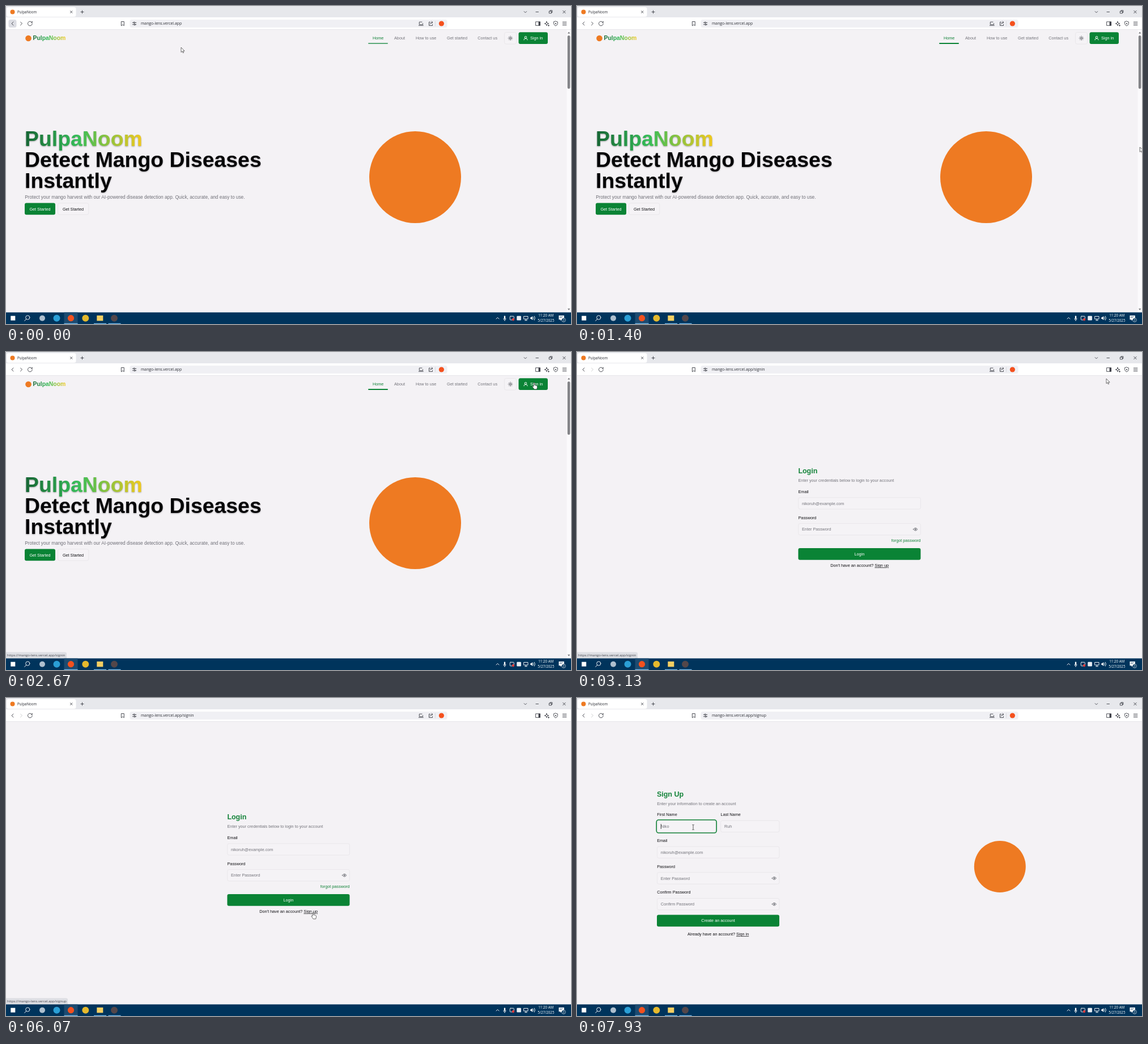
An HTML page for the animation above (8 s loop, 997x561 px).

```html
<!DOCTYPE html>
<html lang="en">
<head>
<meta charset="utf-8">
<title>Browser walkthrough</title>
<style>
html, body { margin: 0; width: 100%; height: 100%; overflow: hidden; background: #f4f2f5; }
svg { display: block; width: 997px; height: 561px; }
text { font: 7.27px "Liberation Sans", Arial, sans-serif; fill: #111114; white-space: pre; }
.ui text { font: 6.85px "Open Sans", sans-serif; fill: #2a2c33; }
.ui .tab { font-size: 6.23px; }
.ui .status { font-size: 6px; fill: #45474e; }
.ui .clock { font-size: 6.2px; fill: #fff; text-anchor: middle; }
.h1 { font-size: 37.4px; font-weight: bold; fill: #050507; }
.h2 { font-size: 12.46px; font-weight: bold; fill: #138339; }
.brand { font-size: 10.4px; font-weight: bold; fill: url(#leaf); }
.lead { font-size: 8.31px; fill: #707078; }
.muted { fill: #74747b; }
.green { fill: #138339; }
.light { fill: #fff; }
.mid { text-anchor: middle; }
.end { text-anchor: end; }
.link { text-decoration: underline; }
.shadow { filter: drop-shadow(0 1.6px 1.2px rgba(0,0,0,.32)); }
.btn { fill: #0a8335; }
.box { fill: #f5f3f6; stroke: #e6e4e8; stroke-width: .8; }
.line { fill: none; stroke: #3d3f47; stroke-width: .9; stroke-linecap: round; stroke-linejoin: round; }
.thin { stroke-width: .7; }
.white { stroke: #fff; }
.mark { fill: #ee7a22; }

.cut { animation: 8s step-end infinite; }
.home { animation-name: home; }
.login { animation-name: login; }
.signup { animation-name: signup; }
.hintIn { animation-name: hintIn; }
.hintUp { animation-name: hintUp; }
.focus { animation-name: focus; }
.arrow { animation-name: arrow; }
.hand { animation-name: hand; }
.beam { animation-name: beam; }
.fwd { animation-name: fwd; }
.hover { animation: hover 8s infinite; }
.active { animation: active 8s infinite; }
.pointer { animation: move 8s ease-in-out infinite; }

@keyframes home { 0% { opacity: 1 } 35.8%, to { opacity: 0 } }
@keyframes login { 0% { opacity: 0 } 35.8% { opacity: 1 } 79%, to { opacity: 0 } }
@keyframes signup { 0% { opacity: 0 } 79%, to { opacity: 1 } }
@keyframes hintIn { 0% { opacity: 0 } 33% { opacity: 1 } 41.5%, to { opacity: 0 } }
@keyframes hintUp { 0% { opacity: 0 } 73% { opacity: 1 } 82.5%, to { opacity: 0 } }
@keyframes focus { 0% { opacity: 0 } 94%, to { opacity: 1 } }
@keyframes fwd { 0% { opacity: 1 } 35.8%, to { opacity: .28 } }
@keyframes hover { 0% { opacity: 1 } 2.5%, to { opacity: 0 } }
@keyframes active { 0% { opacity: .65 } 3%, to { opacity: 1 } }
@keyframes arrow {
  0% { opacity: 1 } 31.6% { opacity: 0 } 35.8% { opacity: 1 } 53.6% { opacity: 0 }
  66.5% { opacity: 1 } 70.8% { opacity: 0 } 79% { opacity: 1 } 88.5%, to { opacity: 0 }
}
@keyframes hand {
  0% { opacity: 0 } 31.6% { opacity: 1 } 35.8% { opacity: 0 } 70.8% { opacity: 1 } 79%, to { opacity: 0 }
}
@keyframes beam {
  0% { opacity: 0 } 53.6% { opacity: 1 } 66.5% { opacity: 0 } 88.5%, to { opacity: 1 }
}
@keyframes move {
  0% { transform: translate(309px, 73px) }
  8.5%, 11.5% { transform: translate(995.4px, 350px) }
  20%, 26% { transform: translate(993px, 227px) }
  33%, 36% { transform: translate(932px, 54px) }
  38.8%, 41.5% { transform: translate(934px, 47px) }
  55.5%, 60.5% { transform: translate(435px, 266px) }
  64.5%, 65.5% { transform: translate(452px, 312px) }
  73%, 81.5% { transform: translate(542px, 378px) }
  91%, to { transform: translate(205px, 228px) }
}
</style>
</head>
<body>
<svg viewBox="0 0 997 561">
  <defs>
    <linearGradient id="leaf">
      <stop offset="0" stop-color="#166534"/>
      <stop offset=".45" stop-color="#35bd58"/>
      <stop offset="1" stop-color="#f2c91d"/>
    </linearGradient>
    <g id="eye">
      <path class="line thin" d="M-3.7 0Q0-5 3.7 0Q0 5-3.7 0Z"/>
      <circle class="line thin" r="1"/>
    </g>
  </defs>

  <rect width="997" height="561" fill="#f4f2f5"/>

  <g class="cut home">
    <circle class="mark" cx="39.5" cy="57" r="5.3"/>
    <text class="brand" x="47.5" y="60.4">PulpaNoom</text>
    <text class="green" x="647" y="59.3">Home</text>
    <rect class="btn active" x="639" y="65" width="35" height="2" rx="1"/>
    <text class="muted" x="685" y="59.3">About</text>
    <text class="muted" x="723" y="59.3">How to use</text>
    <text class="muted" x="778" y="59.3">Get started</text>
    <text class="muted" x="832.3" y="59.3">Contact us</text>
    <rect class="box" x="879.5" y="46.5" width="21" height="20.5" rx="3"/>
    <g transform="translate(890 56.8)">
      <circle class="line" r="1.6"/>
      <path class="line" d="M0-3.7v.6M0 3.1v.6M-3.7 0h.6M3.1 0h.6M-2.6-2.6l.4.4M2.2 2.2l.4.4M-2.6 2.6l.4-.4M2.2-2.2l.4-.4"/>
    </g>
    <rect class="btn" x="904.5" y="46.2" width="51.5" height="20.8" rx="3"/>
    <path class="line white" d="M914 60v-.6q0-1.8 1.8-1.8h2.4q1.8 0 1.8 1.8v.6M915.2 55.2a1.8 1.8 0 1 0 3.6 0a1.8 1.8 0 1 0-3.6 0"/>
    <text class="light" x="925" y="59.3">Sign in</text>

    <g class="shadow">
      <text class="h1" x="33" y="246.7" style="fill:url(#leaf)">PulpaNoom</text>
      <text class="h1" x="33" y="284">Detect Mango Diseases</text>
      <text class="h1" x="33" y="321.3">Instantly</text>
    </g>
    <text class="lead" x="33.2" y="339.7">Protect your mango harvest with our AI-powered disease detection app. Quick, accurate, and easy to use.</text>
    <rect class="btn" x="33" y="347.5" width="54" height="20.8" rx="3"/>
    <text class="light" x="41.4" y="360.5">Get Started</text>
    <rect class="box" x="91.7" y="347.8" width="54" height="20.2" rx="3"/>
    <text x="99.9" y="360.5">Get Started</text>
    <circle class="mark" cx="722" cy="302" r="81"/>

    <rect x="989.5" y="42" width="7.5" height="499" fill="#fbfafc"/>
    <rect x="990.8" y="52" width="4.6" height="94" rx="2.3" fill="#838387"/>
    <path d="M991 48.5l2.2-3 2.2 3zM991 533.7l2.2 3 2.2-3z" fill="#77777b"/>
  </g>

  <g class="cut login">
    <text class="h2" x="390.4" y="214.2">Login</text>
    <text class="muted" x="390.5" y="229">Enter your credentials below to login to your account</text>
    <text x="390.5" y="248.7">Email</text>
    <rect class="box" x="390.7" y="256.8" width="215.7" height="20.3" rx="3"/>
    <text class="muted" x="397" y="269.7">nikoruh@example.com</text>
    <text x="390.5" y="294.5">Password</text>
    <rect class="box" x="390.7" y="302.6" width="215.7" height="20.3" rx="3"/>
    <text class="muted" x="397" y="315.4">Enter Password</text>
    <use href="#eye" x="597.2" y="312.8"/>
    <text class="green end" x="606.4" y="335">forgot password</text>
    <rect class="btn" x="390.4" y="346" width="216" height="20.8" rx="3"/>
    <text class="light mid" x="498.4" y="359">Login</text>
    <text x="447.2" y="379">Don't have an account? <tspan class="link">Sign up</tspan></text>
  </g>

  <g class="cut signup">
    <text class="h2" x="141" y="173.8">Sign Up</text>
    <text class="muted" x="141.2" y="188.5">Enter your information to create an account</text>
    <text x="141.2" y="208.2">First Name</text>
    <text x="253.6" y="208.2">Last Name</text>
    <rect class="box" x="141.4" y="216.3" width="103.6" height="20.3" rx="3"/>
    <rect class="box" x="253.6" y="216.3" width="103.4" height="20.3" rx="3"/>
    <text class="muted" x="148" y="229.1">Niko</text>
    <g class="cut focus">
      <rect x="140.2" y="215" width="106" height="23" rx="4" fill="none" stroke="#138339" stroke-width="1.6"/>
      <rect x="147.8" y="222.2" width=".8" height="8.8" fill="#111"/>
    </g>
    <text class="muted" x="260" y="229.1">Ruh</text>
    <text x="141.2" y="254">Email</text>
    <rect class="box" x="141.4" y="262.1" width="215.6" height="20.3" rx="3"/>
    <text class="muted" x="147.8" y="274.8">nikoruh@example.com</text>
    <text x="141.2" y="299.7">Password</text>
    <rect class="box" x="141.4" y="307.8" width="215.6" height="20.3" rx="3"/>
    <text class="muted" x="147.8" y="320.5">Enter Password</text>
    <use href="#eye" x="348" y="318"/>
    <text x="141.2" y="345.4">Confirm Password</text>
    <rect class="box" x="141.4" y="353.5" width="215.6" height="20.3" rx="3"/>
    <text class="muted" x="147.8" y="366.2">Confirm Password</text>
    <use href="#eye" x="348" y="363.7"/>
    <rect class="btn" x="141" y="382.4" width="216" height="20.8" rx="3"/>
    <text class="light mid" x="249" y="395.4">Create an account</text>
    <text x="195" y="419.3">Already have an account? <tspan class="link">Sign in</tspan></text>
    <circle class="mark" cx="746.3" cy="297.5" r="45.5"/>
  </g>

  <g class="ui">
    <rect width="997" height="21" fill="#e7e8ec"/>
    <rect y="20" width="997" height="21.5" fill="#fff"/>
    <path d="M0 41.5H997" stroke="#e2e2e6" stroke-width=".8"/>
    <rect x="1" y="2" width="122.5" height="17" rx="3.5" fill="#fff"/>
    <circle class="mark" cx="11.5" cy="10.5" r="4"/>
    <text class="tab" x="20" y="12.8">PulpaNoom</text>
    <path class="line" d="M113.4 8.7l3.6 3.6m0-3.6l-3.6 3.6M132 10.5h5M134.5 8v5M914.2 9.6l2.2 2.2 2.2-2.2M935 10.5h4.5M982.7 8.2l4.5 4.5m0-4.5l-4.5 4.5M958.7 9.2h3.8v3.6h-3.8zM960 9v-1.2h3.8v3.7h-1"/>

    <rect class="hover" x="4.5" y="24" width="14" height="14" rx="3.5" fill="#dcdde3"/>
    <path class="line" d="M13 28l-3 3 3 3"/>
    <path class="line cut fwd" d="M25.5 28l3 3-3 3"/>
    <path class="line" d="M45.5 28.6a3.9 3.9 0 1 0 .8 2.4M46.3 27.2v2h-2M203.7 27.5h4.6v7.2l-2.3-1.8-2.3 1.8z"/>
    <rect x="218.5" y="24" width="560" height="14" rx="3.5" fill="#f0f0f4"/>
    <path class="line" d="M223.3 29.3h1.6m2.6 0h2.3M223.3 32.7h2.4m2.6 0h1.5"/>
    <circle class="line" cx="226.2" cy="29.3" r="1.2"/>
    <circle class="line" cx="227" cy="32.7" r="1.2"/>
    <text class="cut home" x="238" y="33.4">mango-lens.vercel.app</text>
    <text class="cut login" x="238" y="33.4">mango-lens.vercel.app/signin</text>
    <text class="cut signup" x="238" y="33.4">mango-lens.vercel.app/signup</text>
    <path class="line" d="M734 28.2h-4.7v4.6h6.2v-2M728.3 34.3h8M748.5 28.3h-2v6.2h6v-2M748.3 32q.3-3 4.2-3.2M751 27.2l2 1.6-2 1.8"/>
    <path d="M757.6 26.5v9" stroke="#cfd0d6" stroke-width=".7"/>
    <circle cx="768.4" cy="31" r="4.6" fill="#f4511e"/>
    <path class="line" d="M935 27.8h7.6v6.6H935zM954 27.3l1 2.7 2.7 1-2.7 1-1 2.7-1-2.7-2.7-1 2.7-1zM957.5 33.3v2.2m-1.1-1.1h2.2M970 26.9l3.4 1.2v2.7q0 2.8-3.4 4.3q-3.4-1.5-3.4-4.3v-2.7zM982.3 28.3h6.6M982.3 31h6.6M982.3 33.7h6.6"/>
    <path d="M939.6 27.8h3v6.6h-3z" fill="#3d3f47"/>
    <circle cx="970" cy="31" r="1.1" fill="#3d3f47"/>

    <g class="cut hintIn">
      <path d="M0 529.5h104q3 0 3 3v8.5H0z" fill="#dddee3"/>
      <text class="status" x="2" y="537.2">https://mango-lens.vercel.app/signin</text>
    </g>
    <g class="cut hintUp">
      <path d="M0 529.5h106q3 0 3 3v8.5H0z" fill="#dddee3"/>
      <text class="status" x="2" y="537.2">https://mango-lens.vercel.app/signup</text>
    </g>

    <rect y="540.5" width="997" height="20.5" fill="#00345c"/>
    <rect x="102.5" y="540.5" width="24" height="20.5" fill="#1d4b70"/>
    <path d="M102.5 560.4h24M155 560.4h22M180.5 560.4h22" stroke="#79bdec" stroke-width="1.2"/>
    <rect x="8.3" y="546.7" width="8" height="8" fill="#fff"/>
    <circle class="line white" cx="38.3" cy="549.6" r="3.6"/>
    <path class="line white" d="M35.7 552.3l-3 3.2"/>
    <circle cx="64" cy="550.7" r="5" fill="#aebfce"/>
    <circle cx="89.5" cy="550.7" r="6" fill="#2a9fd6"/>
    <circle cx="114.5" cy="550.7" r="5.6" fill="#f4511e"/>
    <circle cx="140.3" cy="550.7" r="6" fill="#e5b92d"/>
    <rect x="160.3" y="546" width="11" height="9.4" fill="#f5cf62"/>
    <circle cx="191" cy="550.7" r="6" fill="#54474a"/>

    <path class="line white" d="M865 552l2.5-2.5 2.5 2.5M878 551.5q0 2.3 2 2.3t2-2.3M880 554v1.3M914 547.5h7v4.7h-7zM917.5 552.5v2M915.5 554.7h4M930.3 548.5q1.6 2 0 4.4M932.3 547.2q2.6 3.3 0 7"/>
    <rect x="878.8" y="546.5" width="2.4" height="5.8" rx="1.2" fill="#fff"/>
    <rect class="line white" x="889.3" y="547.3" width="7" height="6.5" rx="1"/>
    <circle cx="895" cy="553" r="2.2" fill="#e23b3b"/>
    <rect x="901.3" y="546.8" width="7.6" height="7.6" rx="1.2" fill="#e8eef4"/>
    <path d="M925.3 549.3h1.5l2.2-2v6.8l-2.2-2h-1.5z" fill="#fff"/>
    <text class="clock" x="952.8" y="548.3">11:20 AM</text>
    <text class="clock" x="952.8" y="557.3">5/27/2025</text>
    <path d="M975.5 546h9.3v7.2h-4.5l-2 2v-2h-2.8z" fill="#fff"/>
    <path d="M977 548h6M977 549.8h4" stroke="#00345c" stroke-width=".6"/>
    <circle cx="984" cy="554" r="3.4" fill="#00345c" stroke="#fff" stroke-width=".6"/>
    <text class="clock" x="984" y="556" style="font-size:5px">3</text>
  </g>

  <g class="pointer" stroke-linejoin="round">
    <path class="cut arrow" d="M0 0v8.6l2-1.8 1.4 3 1.3-.6-1.3-2.9h2.7z" fill="#fff" stroke="#333" stroke-width=".7"/>
    <path class="cut hand" d="M-.9 6.8V.9Q-.9 0 0 0T.9 .9v3.7l3.5.8q1 .3 1 1.3v2.2l-.9 2.9h-4.3l-3.2-4.6q-.2-1 .7-1.1z" fill="#fff" stroke="#333" stroke-width=".7"/>
    <path class="cut beam" d="M-1.8-4.3h1.3l.5.4.5-.4h1.3M0-3.9v7.8M-1.8 4.3h1.3l.5-.4.5.4h1.3" fill="none" stroke="#333" stroke-width=".8"/>
  </g>
</svg>
</body>
</html>
```
